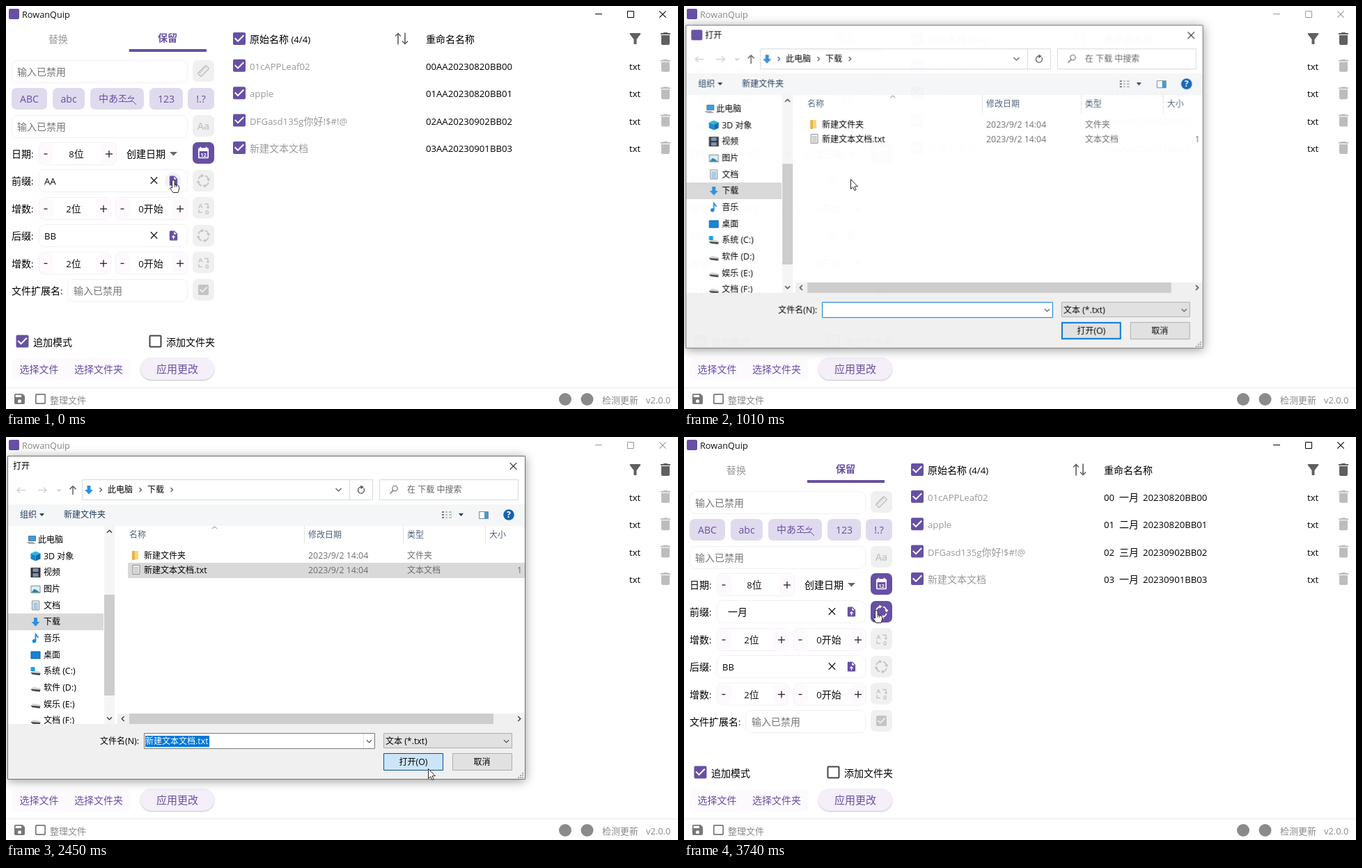
Recreate the animation shown at these times as an HTML page with a canvas. Size 965 by 580 pixels, loop 4.93 s.

```html
<!DOCTYPE html>
<html lang="zh-CN">
<head>
<meta charset="utf-8">
<style>
  html, body { margin: 0; width: 100%; height: 100%; overflow: hidden; background: #fff; }
  canvas { display: block; }
</style>
</head>
<body>
<canvas id="stage" width="965" height="580"></canvas>
<script>
const W = 965, H = 580, LOOP = 4930, STEP = 200 / 3;
const main = document.getElementById('stage').getContext('2d');
const layer = Object.assign(document.createElement('canvas'), { width: W, height: H }).getContext('2d');
const PURPLE = '#6750a4', BLUE = '#0078d7', GRAY = '#8a8a8a', OFF = '#c4c4c4';
let g = main;

const ICONS = {
  trash: 'M6 19c0 1.1.9 2 2 2h8c1.1 0 2-.9 2-2V7H6zM19 4h-3.5l-1-1h-5l-1 1H5v2h14z',
  filter: 'M4.25 5.6 10 13v6q0 1 1 1h2q1 0 1-1v-6l5.74-7.4Q20.3 4 18.95 4H5.04Q3.7 4 4.25 5.6z',
  checked: 'M19 3H5Q3 3 3 5v14q0 2 2 2h14q2 0 2-2V5q0-2-2-2zM10 17l-5-5 1.4-1.4L10 14.2l7.6-7.6L19 8z',
  blank: 'M19 3H5Q3 3 3 5v14q0 2 2 2h14q2 0 2-2V5q0-2-2-2zM5 5h14v14H5z',
  save: 'M17 3H5Q3 3 3 5v14q0 2 2 2h14q2 0 2-2V7zM12 19a3 3 0 1 1 0-6 3 3 0 0 1 0 6zM15 9H5V5h10z',
  upload: 'M14 2H6Q4 2 4 4v16q0 2 2 2h12q2 0 2-2V8zM13 9V3.5L18.5 9zM13 15v4h-2v-4H8l4-4 4 4z',
  calendar: 'M18 4V2h-2v2H8V2H6v2H5Q3 4 3 6v14q0 2 2 2h14q2 0 2-2V6q0-2-2-2zM5 9.5h14V20H5z'
};
const HAND = new Path2D('M-2 9.5V1.6a1.8 1.8 0 0 1 3.6 0V6.5q4 .3 5.8 2q1.5 1 .6 5L6.5 18H-.5L-5 11.5q.8-2 3 0Z');
const ARROW = new Path2D('M0 0V14L3.2 11.2 5.4 16 7.6 15 5.4 10.4 9.8 10.2Z');

// ---- drawing helpers ----
function box(x, y, w, h, fill, stroke, r = 0, lw = 1) {
  g.beginPath();
  if (stroke) g.roundRect(x + lw / 2, y + lw / 2, w - lw, h - lw, r);
  else g.roundRect(x, y, w, h, r);
  if (fill) { g.fillStyle = fill; g.fill(); }
  if (stroke) { g.strokeStyle = stroke; g.lineWidth = lw; g.stroke(); }
}
function line(color, lw, ...p) {
  g.beginPath();
  for (let i = 0; i < p.length; i += 2) g.lineTo(p[i], p[i + 1]);
  g.strokeStyle = color; g.lineWidth = lw; g.stroke();
}
function poly(color, ...p) {
  g.beginPath();
  for (let i = 0; i < p.length; i += 2) g.lineTo(p[i], p[i + 1]);
  g.fillStyle = color; g.fill();
}
function disc(x, y, r, color) {
  g.beginPath(); g.arc(x, y, r, 0, 7); g.fillStyle = color; g.fill();
}
function at(x, y, angle, draw) {
  g.save(); g.translate(x, y); g.rotate(angle); draw(); g.restore();
}
function icon(name, x, y, size, color) {
  g.save();
  g.translate(x - size / 2, y - size / 2); g.scale(size / 24, size / 24);
  g.fillStyle = color; g.fill(new Path2D(ICONS[name]), 'evenodd');
  g.restore();
}
// Chevron pointing right, turned by quarter turns.
function chevron(x, y, turns, s, color = '#555', lw = 1.2) {
  at(x, y, turns * Math.PI / 2, () => line(color, lw, -s / 2, -s, s / 2, 0, -s / 2, s));
}
function cross(x, y, s, color, lw = 1.1) {
  line(color, lw, x - s, y - s, x + s, y + s);
  line(color, lw, x + s, y - s, x - s, y + s);
}
// Text with its middle at y; CJK and Latin runs are sized separately.
function text(s, x, y, size = 14, color = '#000', { center, weight = 400, k = 0.94 } = {}) {
  const runs = s.match(/[\u2e80-\uffef]+|[^\u2e80-\uffef]+/g).map(str => {
    const font = str.charCodeAt(0) >= 0x2e80
      ? `${weight} ${size}px "Noto Sans CJK SC", "Noto Sans CJK", sans-serif`
      : `${weight} ${size * k}px "Open Sans", "Noto Sans", sans-serif`;
    g.font = font;
    return { str, font, w: g.measureText(str).width };
  });
  if (center) x -= runs.reduce((sum, r) => sum + r.w, 0) / 2;
  g.fillStyle = color;
  for (const r of runs) { g.font = r.font; g.fillText(r.str, x, y + size * 0.36); x += r.w; }
}
const small = (s, x, y, color = '#000', o = {}) => text(s, x, y, 12, color, { k: 1.03, ...o });

// ---- main window ----
const field = (x, y, w) => box(x, y, w, 33, '#fff', '#f3eff5', 8);
const button = (y, on) => box(268, y, 31, 31, on ? PURPLE : '#f0f0f0', null, 7);

function stepper(x, w, y, label, mid) {
  field(x, y - 17, w);
  box(x + 1, y - 15, 20, 29, '#fdf9fd', null, 7);
  box(x + w - 22, y - 15, 20, 29, '#fdf9fd', null, 7);
  line('#222', 1.3, x + 7.5, y, x + 12.5, y);
  const px = x + w - 11;
  line('#222', 1.3, px - 5, y, px + 5, y);
  line('#222', 1.3, px, y - 5, px, y + 5);
  text(label, mid, y, 14, '#111', { center: true });
}
function cycleIcon(y, color) {
  for (let i = 0; i < 4; i++) at(283.5, y, i * Math.PI / 2, () => {
    g.beginPath(); g.arc(0, 0, 7.7, -1.25, -0.3);
    g.strokeStyle = color; g.lineWidth = 1.7; g.stroke();
    poly(color, 4.5, -2.8, 10, -3, 7.6, 1);
  });
}
function counterIcon(y) {
  text('A', 276, y - 4, 10, OFF, { weight: 700 });
  text('0', 286, y + 5, 10, OFF, { weight: 700 });
  line(OFF, 1.4, 285, y - 6, 290, y - 6, 290, y - 1);
  line(OFF, 1.4, 277, y + 2, 277, y + 6, 282, y + 6);
  poly(OFF, 287.5, y - 2, 292.5, y - 2, 290, y + 1);
}
function affix(y, label, value, x, on) {
  text(label, 8, y);
  field(47, y - 17, 214);
  text(value, x, y);
  cross(212.5, y - 1, 4.7, '#222', 1.4);
  icon('upload', 240.5, y - 0.5, 17, PURPLE);
  button(y - 16, on);
  cycleIcon(y - 0.5, on ? '#fff' : OFF);
}
function counters(y) {
  text('增数:', 8, y);
  stepper(47, 104, y, '2位', 97);
  stepper(157, 104, y, '0开始', 208);
  button(y - 17);
  counterIcon(y - 1);
}

function drawApp(n) {
  const idle = n >= 5 && n < 40, loaded = n >= 41, cycling = n >= 50;
  const tone = idle ? '#999' : '#000';
  box(0, 0, W, H, '#fff');
  box(4, 4, 15, 15, PURPLE, null, 2);
  text('RowanQuip', 23, 12, 13, idle ? '#888' : '#111', { k: 0.98 });
  line(tone, 1, 846, 11.5, 856, 11.5);
  box(892, 7, 10, 10, null, tone);
  cross(943, 12, 4.7, tone);

  text('替换', 75, 48, 14, '#999', { center: true });
  text('保留', 232, 46, 14, PURPLE, { center: true, weight: 700 });
  box(177, 62, 111, 4, PURPLE);

  for (const y of [78, 157]) {
    field(8, y, 253);
    text('输入已禁用', 16, y + 17, 14, '#757575');
    button(y);
  }
  at(283.5, 93.5, -Math.PI / 4, () => {
    box(-9, -4, 18, 8, null, OFF, 1, 1.6);
    for (const x of [-5, -1.5, 2, 5.5]) line(OFF, 1.2, x, -4, x, 0);
  });
  text('Aa', 283.5, 173, 15, OFF, { center: true, weight: 600 });

  const chip = (x, w, label) => {
    box(x, 118, w, 31, '#e0daee', null, 7);
    if (label) text(label, x + w / 2, 133.5, 15, PURPLE, { center: true });
  };
  chip(8, 51, 'ABC'); chip(67, 46, 'abc'); chip(121, 77); chip(206, 48, '123'); chip(261, 38, '!.?');
  text('中あ조', 133, 133, 14, PURPLE);
  line(PURPLE, 1, 172, 138, 182, 137, 187, 142);
  line(PURPLE, 1, 180, 129, 175, 133, 184, 132, 179, 137);

  text('日期:', 8, 213);
  stepper(47, 112, 213, '8位', 101);
  text('创建日期', 173, 213);
  poly('#666', 235, 210, 246, 210, 240.5, 215.5);
  button(196, true);
  icon('calendar', 283.5, 211, 20, '#fff');
  text('12', 283.5, 214.5, 8, '#fff', { center: true, weight: 700 });

  affix(252, '前缀:', loaded ? '一月' : 'AA', loaded ? 63 : 55, cycling);
  if (n < 5) disc(240, 252, 12, 'rgba(103,80,164,.08)');
  if (n === 49 || n === 51 || n === 52) disc(283.5, 251, 12, 'rgba(160,145,205,.2)');
  counters(292);
  affix(331, '后缀:', 'BB', 55);
  counters(370.5);

  text('文件扩展名:', 8, 410);
  field(88, 393, 173);
  text('输入已禁用', 97, 410, 14, '#757575');
  button(393);
  icon('checked', 283.5, 408.5, 20, OFF);

  icon('checked', 23.5, 482.5, 24, PURPLE);
  text('追加模式', 39, 484);
  icon('blank', 214.5, 482.5, 24, '#444');
  text('添加文件夹', 230, 484);
  box(8, 507, 171, 32, '#fdfafe', null, 8);
  text('选择文件', 19.5, 523, 14, PURPLE);
  text('选择文件夹', 98, 523, 14, PURPLE);
  g.save();
  g.shadowColor = 'rgba(0,0,0,.25)'; g.shadowBlur = 2; g.shadowOffsetY = 1;
  box(193, 506, 106, 32, '#f4eff9', null, 16);
  g.restore();
  text('应用更改', 246, 522.5, 15, PURPLE, { center: true });

  line('#ececec', 1, 0, 549.5, W, 549.5);
  icon('save', 19.5, 565.5, 20, '#777');
  icon('blank', 49.5, 565.5, 20, '#777');
  text('整理文件', 63, 567, 13, GRAY);
  disc(803, 566, 9, GRAY);
  disc(834.5, 566, 9, GRAY);
  text('检测更新', 856, 567, 13, GRAY);
  text('v2.0.0', 919, 567, 13, GRAY, { k: 0.99 });

  icon('checked', 335, 47, 24, PURPLE);
  text('原始名称 (4/4)', 350, 48);
  for (const [x, turn] of [[563, 0], [573, Math.PI]]) at(x, 47, turn, () => {
    line('#666', 1.7, 0, 8.5, 0, -7.5);
    line('#666', 1.7, -4, -3.5, 0, -7.5, 4, -3.5);
  });
  text('重命名名称', 603, 48);
  icon('filter', 903.5, 47, 24, '#606060');
  icon('trash', 947, 47, 24, '#606060');

  const names = ['01cAPPLeaf02', 'apple', 'DFGasd135g你好!$#!@', '新建文本文档'];
  const dates = ['20230820', '20230820', '20230902', '20230901'];
  const months = ['一月', '二月', '三月', cycling ? '一月' : ''];
  names.forEach((name, i) => {
    const y = 86.8 + i * 39.4, id = '0' + i, tail = dates[i] + 'BB' + id;
    icon('checked', 335, y - 1, 24, PURPLE);
    text(name, 350, y, 14, '#999');
    if (!loaded) text(id + 'AA' + tail, 603, y);
    else if (!months[i]) text(id + tail, 603, y);
    else { text(id, 603, y); text(months[i], 625, y); text(tail, 659, y); }
    text('txt', 895, y);
    icon('trash', 947, y - 1, 24, '#bdbdbd');
  });
}

// ---- file dialog ----
function downArrow(x, y) {
  poly('#2f8fdc', x - 2.5, y - 6, x + 2.5, y - 6, x + 2.5, y, x + 6, y, x, y + 6.5, x - 6, y, x - 2.5, y);
}
function drive(x, y) {
  poly('#d4d4d4', x - 7, y + 2, x - 3, y - 1, x + 7, y + 1, x + 7, y + 3);
  poly('#444', x - 7, y + 2, x + 7, y + 3, x + 6, y + 6, x - 5, y + 4.5);
}
function page(x, y, ink) {
  box(x - 5.5, y - 7, 11, 14, '#fafafa', '#888');
  for (let i = -4; i < 6; i += 2) line(ink, 1, x - 3.5, y + i + 0.5, x + 3.5, y + i + 0.5);
}
const PLACES = [
  ['3D 对象', (x, y) => {
    poly('#29b6dd', x - 7, y - 4, x, y - 7, x + 7, y - 4, x, y - 1);
    poly('#1687c9', x - 7, y - 4, x, y - 1, x, y + 7, x - 7, y + 4);
    poly('#0f6cab', x + 7, y - 4, x, y - 1, x, y + 7, x + 7, y + 4);
  }],
  ['视频', (x, y) => { box(x - 7, y - 7, 14, 14, '#333'); box(x - 4, y - 6, 8, 5, '#7d8fb3'); box(x - 4, y + 1, 8, 5, '#7d8fb3'); }],
  ['图片', (x, y) => { box(x - 7, y - 5, 14, 11, '#d8effb', '#888'); poly('#2d7f9f', x - 6, y + 5, x - 2, y, x + 2, y + 2, x + 6, y + 5); }],
  ['文档', (x, y) => page(x, y, '#4aa3d8')],
  ['下载', downArrow],
  ['音乐', (x, y) => { disc(x - 2, y + 4, 2.7, '#1a8ad6'); line('#1a8ad6', 1.8, x, y + 4, x, y - 6, x + 4, y - 1); }],
  ['桌面', (x, y) => box(x - 7, y - 5, 14, 11, '#1483d4', '#0d5ea3')],
  ['系统 (C:)', (x, y) => { drive(x, y); box(x - 7, y - 6, 6, 6, '#18a0e8'); }],
  ['软件 (D:)', drive], ['娱乐 (E:)', drive], ['文档 (F:)', drive]
];

function drawChrome() {
  line('#ccc', 1.3, 28, 76.5, 16, 76.5); chevron(18, 76.5, 2, 4, '#ccc');
  line('#ccc', 1.3, 46, 76.5, 58, 76.5); chevron(56, 76.5, 0, 4, '#ccc');
  chevron(76, 76.5, 1, 2.5, '#bbb');
  line('#555', 1.4, 96, 83, 96, 72); chevron(96, 73, 3, 4.5, '#555', 1.4);
  box(109, 61, 385, 30, '#fff', '#d9d9d9');
  box(493, 61, 34, 30, '#fff', '#d9d9d9');
  box(536, 61, 200, 30, '#fff', '#d9d9d9');
  downArrow(119, 76);
  for (const x of [136, 193, 238]) chevron(x, 76, 0, 3);
  small('此电脑', 146, 76); small('下载', 203, 76);
  chevron(477.5, 76, 1, 4);
  g.beginPath(); g.arc(510, 76.5, 4.5, -0.6, 4.6); g.strokeStyle = '#555'; g.lineWidth = 1.3; g.stroke();
  poly('#555', 509, 69.5, 514, 72, 509.5, 75);
  g.beginPath(); g.arc(558.5, 74, 3.7, 0, 7); g.strokeStyle = '#666'; g.lineWidth = 1.1; g.stroke();
  line('#666', 1.2, 556, 77, 551.5, 81.5);
  small('在 下载 中搜索', 576, 76, '#666');

  small('组织', 20, 112, '#1e395b');
  poly('#1e395b', 48, 110, 55, 110, 51.5, 114);
  small('新建文件夹', 83, 112, '#1e395b');
  for (const y of [108, 112, 116]) {
    line('#777', 2, 626, y, 629, y); line('#aaa', 1.5, 631, y, 634, y); line('#aaa', 1.5, 636, y, 640, y);
  }
  poly('#1e395b', 650, 110, 657, 110, 653.5, 114);

  g.save();
  g.beginPath(); g.rect(3, 128, 138, 285); g.clip();
  box(3, 254, 137, 24, '#d9d9d9');
  box(32, 142, 11, 8, '#3d9be0', '#58798f');
  poly('#aaa', 29, 151, 39, 151, 43, 154, 33, 154);
  small('此电脑', 46, 148);
  PLACES.forEach(([name, draw], i) => {
    const y = 171.4 + i * 23.67;
    draw(42.5, y);
    small(name, 54, y);
  });
  g.restore();
}

function drawFooter(n) {
  const picked = n >= 24, done = n >= 36, hot = n >= 33;
  small('文件名(N):', 135, 438);
  box(198, 426, 332, 23, '#fff', picked ? '#7a7a7a' : BLUE);
  if (done) { box(200, 430, 92, 16, BLUE); line('#ddd', 1, 513.5, 427, 513.5, 448); }
  if (picked) small('新建文本文档.txt', 200, 438, done ? '#fff' : '#000');
  chevron(521.5, 438, 1, 3.5);
  box(542, 426, 185, 22, '#e1e1e1', '#adadad');
  small('文本 (*.txt)', 545, 438);
  chevron(718.5, 438, 1, 3.5);
  box(542, 455, 86, 25, hot ? '#cce4f7' : '#e1e1e1', hot ? '#005499' : BLUE, 0, hot ? 1 : 2);
  small('打开(O)', 585, 468, '#000', { center: true });
  box(641, 455, 86, 25, '#e1e1e1', '#adadad');
  small('取消', 683.5, 468, '#000', { center: true });
  for (let i = 0; i < 3; i++) for (let j = 0; j <= i; j++) box(741 - j * 3, 483 + i * 3, 2, 2, '#aaa');
}

function drawDialog(n) {
  const partial = n < 14, closing = n >= 36;
  g.clearRect(0, 0, W, H);
  box(2, 27, 744, 466, '#fff');
  if (!closing) box(10, 34, 16, 15, PURPLE, null, 2);
  small('打开', closing ? 10 : 30, 42);
  cross(728.5, 42, 4.8, '#222');
  box(3, 97, 742, 31, '#f5f6f7');
  box(679, 107, 14, 11, '#fff', '#7d8894');
  box(687, 108, 5, 9, '#3c9bd6');
  disc(722, 112, 7.8, '#1264b4');
  small('?', 722, 112, '#fff', { center: true, weight: 700 });

  box(141, 128, 15, 285, '#f5f5f5');
  box(141, 227, 15, 145, '#cdcdcd');
  chevron(148.5, 136, 3, 3.5, '#444', 1.5);
  chevron(148.5, 405, 1, 3.5, '#444', 1.5);

  [['名称', 177], ['修改日期', 434], ['类型', 576], ['大小', 694]].forEach(([s, x]) => small(s, x, 141, '#4c607a'));
  for (const x of [428.5, 570.5, 688.5]) line('#e5e5e5', 1, x, 128, x, 154);
  chevron(299.5, 130.5, 3, 3.5, '#777', 1);

  if (closing) box(175, 181, 570, 22, '#d9d9d9');
  else if (n >= 24) box(175, 181, 570, 22, '#cce8ff', '#99d1ff');
  else if (n >= 22) box(175, 181, 570, 22, '#e5f3ff');
  box(181, 164, 9, 12, '#f8d775'); box(181, 164, 4, 13, '#e8b54a');
  page(187, 191, '#aaa');
  small('新建文件夹', 198, 171);
  small('新建文本文档.txt', 198, 192);
  [['文件夹', 171], ['文本文档', 192]].forEach(([type, y]) => {
    small('2023/9/2 14:04', 434, y, '#6d6d6d');
    small(type, 576, y, '#6d6d6d');
  });
  small('1', 734, 192, '#6d6d6d');

  box(160, 398, 585, 15, '#f0f0f0');
  box(177, 398, 523, 15, '#cdcdcd');
  chevron(168, 405.5, 2, 3.5, '#444', 1.5);
  chevron(737, 405.5, 0, 3.5, '#444', 1.5);
  box(3, 413, 742, 79, '#f0f0f0');
  if (partial) {
    box(135, 430, 56, 15, '#fff'); box(198, 426, 332, 23, '#fff'); box(542, 426, 185, 22, '#fff');
    box(542, 454, 87, 27, '#fff'); box(640, 454, 87, 27, '#fff'); box(729, 476, 16, 16, '#fff');
  } else {
    drawChrome();
    drawFooter(n);
  }
  box(2, 27, 744, 466, null, '#707070');
}

// Opacity and scale of the dialog while it opens and closes.
const FADE = { 12: [0.35, 0.96], 13: [0.77, 0.989], 14: [0.93, 0.996], 15: [0.98, 0.999], 38: [0.6, 0.985], 39: [0.2, 0.96] };

function showDialog(n) {
  if (n < 12 || n > 39) return;
  const [alpha, scale] = FADE[n] || [1, 1];
  g = layer; drawDialog(n); g = main;
  g.save();
  g.globalAlpha = alpha;
  g.translate(374, 260); g.scale(scale, scale); g.translate(-374, -260);
  // The shadow falls only outside the dialog, so it never darkens the fading window.
  g.save();
  g.beginPath(); g.rect(-50, -50, W + 100, H + 100); g.rect(2, 27, 744, 466); g.clip('evenodd');
  g.shadowColor = 'rgba(0,0,0,.4)'; g.shadowBlur = 14; g.shadowOffsetY = 2;
  box(2, 27, 744, 466, '#fff');
  g.restore();
  g.drawImage(layer.canvas, 0, 0);
  g.restore();
}

// ---- pointer: step, x, y ----
const PATH = [
  [0, 240, 250], [19, 239, 249], [22, 241, 187], [25, 241, 187], [27, 290, 250], [30, 510, 425],
  [33, 590, 469], [35, 606, 477], [40, 606, 477], [43, 330, 345], [45, 260, 281], [48, 276, 249], [99, 276, 249]
];
function drawPointer(n) {
  const i = PATH.findIndex(p => p[0] > n), [n0, x0, y0] = PATH[i - 1], [n1, x1, y1] = PATH[i];
  const f = (n - n0) / (n1 - n0), hand = n < 6 || n >= 45, shape = hand ? HAND : ARROW;
  at(Math.round(x0 + (x1 - x0) * f) + 0.5, Math.round(y0 + (y1 - y0) * f) + 0.5, 0, () => {
    g.fillStyle = '#fff'; g.fill(shape);
    g.strokeStyle = '#111'; g.lineWidth = 0.9; g.stroke(shape);
    if (hand) for (const x of [1.6, 4]) line('#111', 0.9, x, 7, x, 10);
  });
}

function frame(now) {
  const n = Math.floor((now % LOOP + 20) / STEP);
  drawApp(n);
  showDialog(n);
  drawPointer(n);
  requestAnimationFrame(frame);
}
requestAnimationFrame(frame);
</script>
</body>
</html>
```
